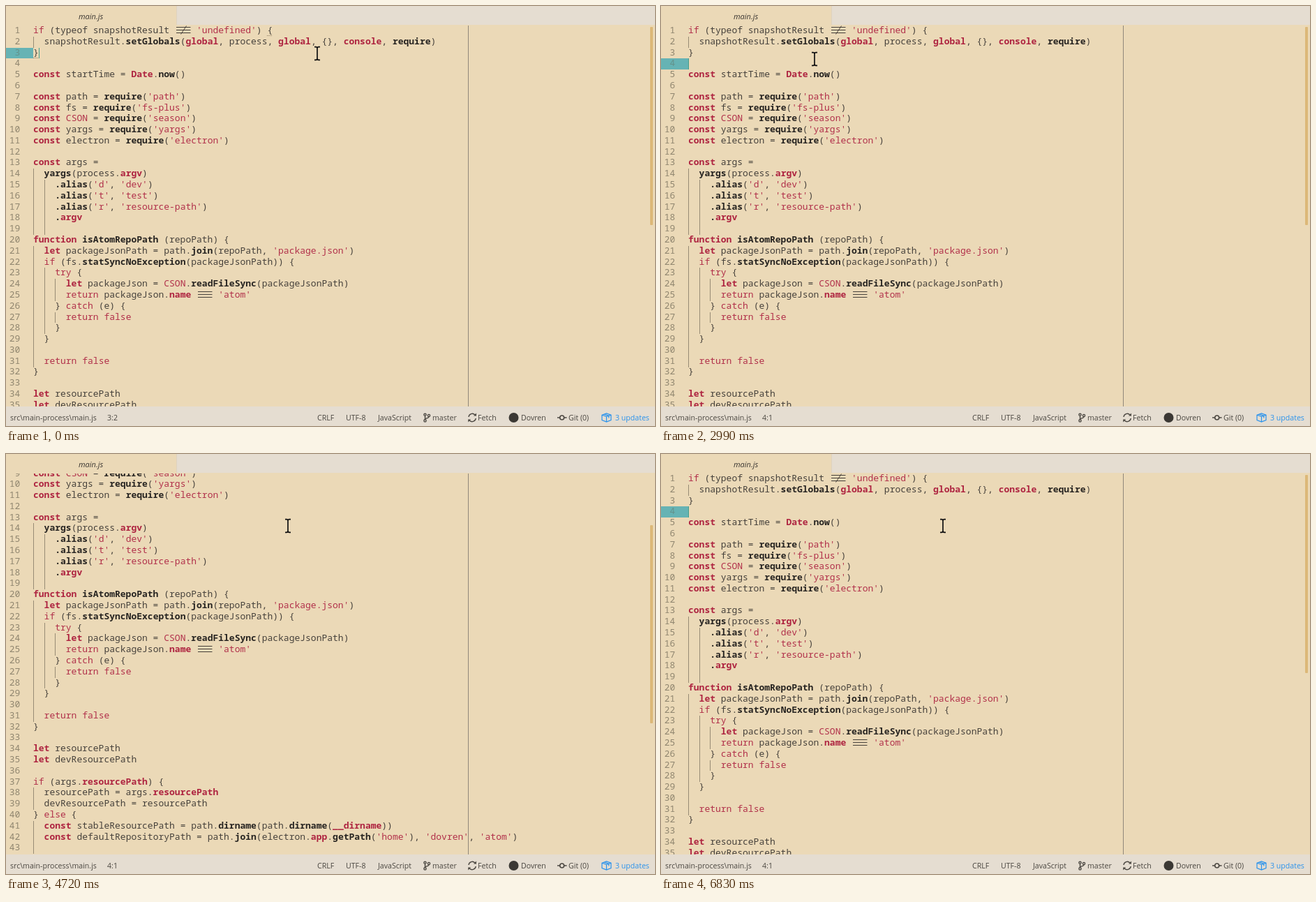
An HTML page that plays this animation: 930 by 602 pixels, repeating every 6.93 s.

```html
<!DOCTYPE html>
<html lang="en">
<head>
<meta charset="utf-8">
<title>Editor</title>
<style>
html, body { margin: 0; width: 100%; height: 100%; overflow: hidden; background: #ebd9b7; }
#stage { position: relative; width: 930px; height: 602px; overflow: hidden; background: #ebd9b7;
  font: 10.6px/16px "Open Sans", "Noto Sans", sans-serif; color: #4b4741; }
#stage div, #stage svg, #bar span { position: absolute; }
#tabs { left: 244px; top: 0; width: 686px; height: 27px; background: #e5ddd1; border-left: 1px solid #dfd3bf; box-sizing: border-box; }
#tab { left: 104px; top: 7px; font-style: italic; font-size: 11px; color: #3a3631; }
#editor { left: 0; top: 28px; width: 930px; height: 546px; overflow: hidden; }
#doc { left: 0; top: 0; width: 930px; height: 700px; }
.line { left: 39px; margin-top: -1px; }
.line, .num { white-space: pre; font: 13px/15.79px "Noto Sans Mono", "DejaVu Sans Mono", monospace; color: #46413b; }
.num { left: 0; width: 20.4px; margin-top: -1px; text-align: right; color: #90866f; }
.num.on { color: #64928b; }
.k, .s { color: #b1304a; }
.k, .f { font-weight: bold; }
.f { color: #272421; }
.k { color: #ae2440; }
.lig { position: relative; color: transparent; }
.lig svg { left: 0; top: 0; }
.guide { width: 1px; height: 15.9px; background: #988b75; }
.sel { background: #e4cca0; }
#gutter { left: 0; width: 39px; background: #66b3b4; }
#caret { width: 1.5px; height: 15.8px; background: #459d8a; }
.match { width: 7px; height: 14px; border-bottom: 1px dotted #8d7a5e; }
#wrap { left: 662px; top: 0; width: 1px; height: 546px; background: #90877a; }
#thumb { left: 923px; width: 4px; height: 284px; background: #dcb878; border-radius: 1px; }
#bar { left: 0; top: 574px; width: 930px; height: 28px; background: #e5ddd1; }
#bar span { top: 8px; white-space: pre; }
#bar svg { left: 0; top: 0; }
</style>
</head>
<body>
<div id="stage">
  <div id="tabs"></div>
  <div id="tab">main.js</div>
  <div id="editor">
    <div id="doc">
      <div id="gutter"></div>
      <div class="sel"></div><div class="sel"></div><div class="sel"></div>
    </div>
    <div id="wrap"></div>
    <div id="thumb"></div>
  </div>
  <div id="bar">
    <svg width="930" height="28" fill="none" stroke="#4b4741" stroke-width="1.4">
      <g>
        <circle cx="600.5" cy="11.8" r="1.6"/><circle cx="600.5" cy="20.4" r="1.6"/><circle cx="606" cy="13" r="1.6"/>
        <path d="M600.5 13.4V18.8M606 14.6Q606 16.8 600.8 17.4"/>
      </g>
      <g>
        <path d="M663 15A5.2 5.2 0 0 1 672 12M673.2 17A5.2 5.2 0 0 1 664.2 20"/>
        <path d="M670 13.6H674V9.6ZM666.2 18.4H662.2V22.4Z" fill="#4b4741" stroke="none"/>
      </g>
      <circle cx="727.5" cy="16" r="7" fill="#3b3834" stroke="none"/>
      <g stroke-width="1.6"><circle cx="796.7" cy="16" r="3"/><path d="M790 16H793.7M799.7 16H803.6"/></g>
      <g stroke="#2b93ec" stroke-width="1.2">
        <path d="M854 12.2L860.5 10L867 12.2V19.6L860.5 22L854 19.6ZM854 12.2L860.5 14.4L867 12.2M860.5 14.4V22M857.2 11.1L863.8 13.3V16.4"/>
      </g>
    </svg>
    <span style="left:6px">src\main-process\main.js</span>
    <span style="left:145px" id="pos"></span>
    <span style="left:177px" id="count"></span>
    <span style="left:446px">CRLF</span>
    <span style="left:487px">UTF-8</span>
    <span style="left:533px">JavaScript</span>
    <span style="left:611px">master</span>
    <span style="left:676px">Fetch</span>
    <span style="left:738px">Dovren</span>
    <span style="left:806px">Git (0)</span>
    <span style="left:873px;color:#2b93ec">3 updates</span>
  </div>
  <svg id="mouse" width="14" height="24" viewBox="-7 -12 14 24" fill="none" stroke="#111" stroke-width="1.7">
    <path d="M-4 -9.3H-2Q0 -9.3 0 -7.3Q0 -9.3 2 -9.3H4M0 -7.5V7.5M-4 9.3H-2Q0 9.3 0 7.3Q0 9.3 2 9.3H4"/>
  </svg>
</div>
<script>
const LOOP = 6930, LH = 15.79, CW = 7.8, LEFT = 39, NOTCH = 44.6;
const $ = id => document.getElementById(id);
const code = `if (typeof snapshotResult !== 'undefined') {
  snapshotResult.setGlobals(global, process, global, {}, console, require)
}

const startTime = Date.now()

const path = require('path')
const fs = require('fs-plus')
const CSON = require('season')
const yargs = require('yargs')
const electron = require('electron')

const args =
  yargs(process.argv)
    .alias('d', 'dev')
    .alias('t', 'test')
    .alias('r', 'resource-path')
    .argv

function isAtomRepoPath (repoPath) {
  let packageJsonPath = path.join(repoPath, 'package.json')
  if (fs.statSyncNoException(packageJsonPath)) {
    try {
      let packageJson = CSON.readFileSync(packageJsonPath)
      return packageJson.name === 'atom'
    } catch (e) {
      return false
    }
  }

  return false
}

let resourcePath
let devResourcePath

if (args.resourcePath) {
  resourcePath = args.resourcePath
  devResourcePath = resourcePath
} else {
  const stableResourcePath = path.dirname(path.dirname(__dirname))
  const defaultRepositoryPath = path.join(electron.app.getPath('home'), 'dovren', 'atom')
`.split('\n');

// Alternatives: soft red, ligature, bold red, bold dark
const TOKEN = new RegExp([
  /('[^']*'|\b(?:if|return|try|catch|false|else)\b|\bCSON\b)/,
  /([!=]==)/,
  /(\b(?:const|let|function|Date|global|console|__dirname)\b|(?<=\.)(?:argv|name|app|resourcePath)\b)/,
  /(\b\w+(?=\()|\brequire\b|isAtomRepoPath|(?<=  )\.)/
].map(r => r.source).join('|'), 'g');

const ligature = op => `<span class="lig">${op}<svg width="24" height="16" stroke="#46413b" stroke-width="1">` +
  `<path d="M2 5.5H22.5M2 9.5H22.5M2 13.5H22.5${op[0] === '!' ? 'M16.5 3.5L8.5 15.5' : ''}"/></svg></span>`;

const paint = text => text.replace(TOKEN, (m, soft, op, key) =>
  op ? ligature(op) : `<span class="${soft ? 's' : key ? 'k' : 'f'}">${m}</span>`);

function add(cls, style, html = '') {
  const el = document.createElement('div');
  el.className = cls;
  Object.assign(el.style, style);
  el.innerHTML = html;
  $('doc').append(el);
  return el;
}

let indent = 0;
const nums = code.map((text, i) => {
  const top = i * LH + 'px';
  if (text) indent = text.search(/\S/) / 2;
  for (let g = 0; g < indent; g++) add('guide', { top, left: LEFT + g * 2 * CW + 'px' });
  add('line', { top }, paint(text));
  return add('num', { top }, i + 1);
});
const matches = [[0, 43], [2, 0]].map(([row, col]) =>
  add('match', { top: row * LH + 'px', left: LEFT + col * CW + 'px' }));
const caret = add('', {});
caret.id = 'caret';
const sels = [...document.querySelectorAll('.sel')];

// [time, x, y]
const mouse = [
  [0, 446, 68], [120, 424, 66], [240, 372, 57], [360, 290, 42], [480, 196, 29], [600, 108, 22],
  [720, 47, 33], [840, 37, 32], [1080, 62, 21], [1200, 122, 25], [1310, 186, 40], [1430, 225, 58],
  [1550, 229, 73], [1660, 213, 81], [1780, 212, 82], [2140, 213, 82], [2260, 215, 81],
  [2380, 218, 79], [2500, 219, 77], [2620, 220, 76], [3360, 330, 94], [3480, 404, 103]
];
// [time, wheel notches]
const scroll = [[0, 0], [3730, .5], [3860, 1], [4110, 1.5], [4230, 2], [4720, 3], [5850, 2], [6350, 1.5], [6460, 1], [6710, .5], [6830, 0]];
// [time, caret visible]
const blink = [[0, 1], [1310, 0], [1660, 1], [1900, 0], [2260, 1], [2620, 0], [2990, 1], [3360, 0], [3730, 1]];
const DRAG_END = 840, CLICK = 2990;

const at = (table, t) => table.findLast(step => step[0] <= t);
const clamp = (v, lo, hi) => Math.max(lo, Math.min(hi, v));

function box(el, x, y, w, h) {
  Object.assign(el.style, { left: x + 'px', top: y + 'px', width: Math.max(0, w) + 'px', height: h + 'px' });
}

function cursorAt(t) {
  if (t >= CLICK) return { row: 3, col: 0, last: 3, chars: 0 };
  const [, x, y] = at(mouse, Math.min(t, DRAG_END));
  const row = clamp(Math.floor((y - 28) / LH), 0, 2);
  const col = clamp(Math.round((x - LEFT) / CW), 0, code[row].length);
  let chars = 1 - col;
  for (let r = row; r < 2; r++) chars += code[r].length + 2;
  return { row, col, last: 2, chars };
}

function draw(t) {
  const [, mx, my] = at(mouse, t);
  $('mouse').style.left = mx - 7 + 'px';
  $('mouse').style.top = my - 12 + 'px';

  const notch = at(scroll, t)[1];
  $('doc').style.top = -notch * NOTCH + 'px';
  $('thumb').style.top = 2 + notch * 24 + 'px';

  const { row, col, last, chars } = cursorAt(t);
  $('gutter').style.top = row * LH + 'px';
  $('gutter').style.height = (last - row + 1) * LH + 'px';
  nums.forEach((el, i) => el.classList.toggle('on', i >= row && i <= last));

  sels.forEach((el, r) => {
    const x = r === row ? LEFT + col * CW : LEFT;
    const end = r === 2 ? LEFT + CW : 921;
    box(el, x, r * LH, chars && r >= row ? end - x : 0, LH + .1);
  });

  caret.style.left = LEFT + col * CW - .3 + 'px';
  caret.style.top = row * LH + 'px';
  caret.style.opacity = at(blink, t)[1];
  matches.forEach(el => el.style.opacity = +(row === 2 && !chars));

  $('pos').textContent = `${row + 1}:${col + 1}`;
  $('count').textContent = chars ? `(${last - row + 1}, ${chars})` : '';
}

const start = performance.now();
function tick() {
  draw((performance.now() - start) % LOOP);
  requestAnimationFrame(tick);
}
tick();
</script>
</body>
</html>
```
